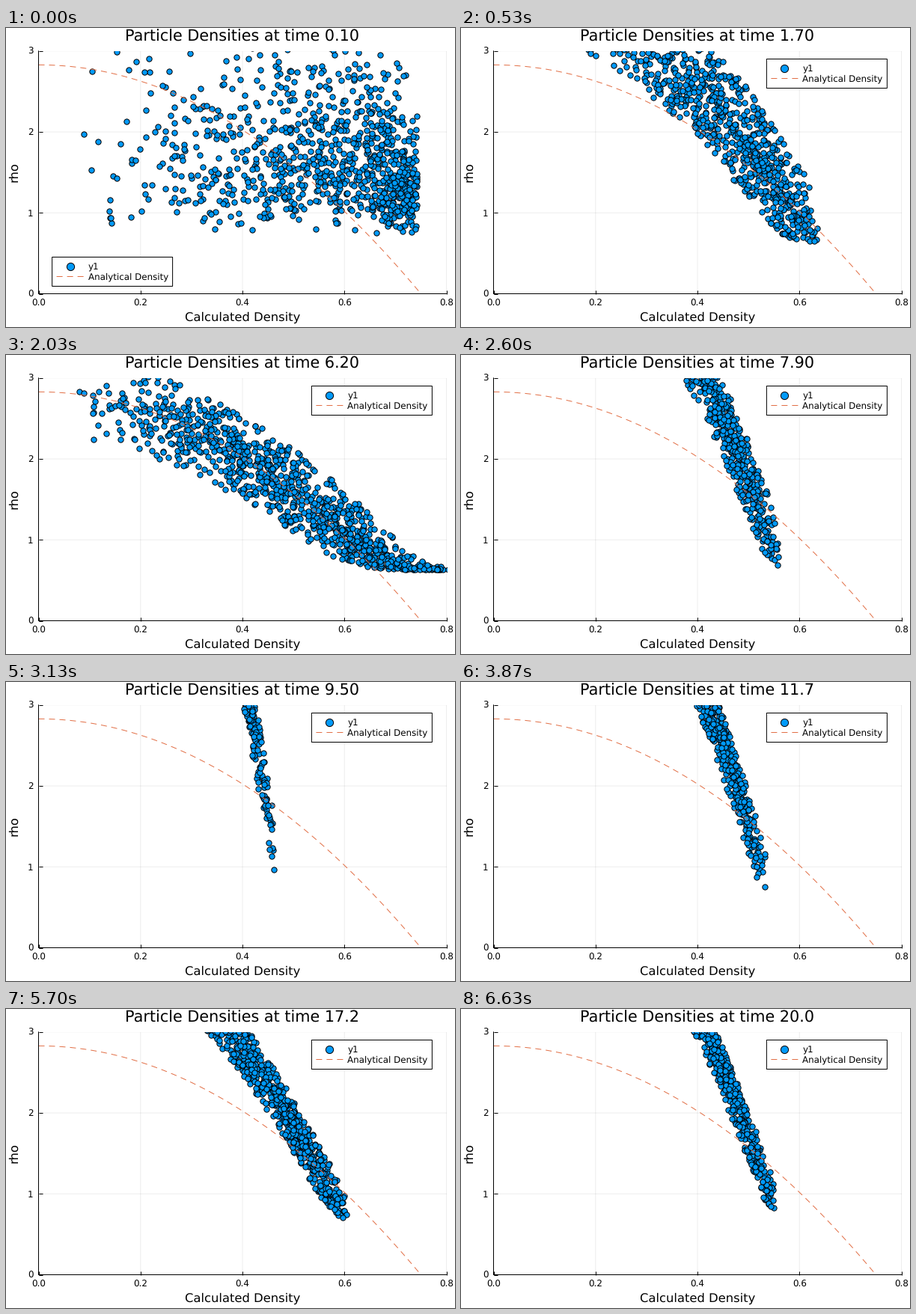
These frames come from a looping animation (600 px wide and 400 px high, 6660 ms). A matplotlib script:

```python
import numpy as np
import matplotlib as mpl
import matplotlib.pyplot as plt
from matplotlib.animation import FuncAnimation
from matplotlib.patches import Rectangle

W, H, PX = 600, 400, 0.72          # stage size, points per pixel at 100 dpi
TICK, LOOP, FPS = 30, 6660, 30     # clock step and loop in ms, data rate
LEFT, RIGHT, TOP, BOTTOM = 43.5, 588.5, 30.8, 355.5
BLUE, ORANGE = "#009afa", "#e26f46"
DASH = (0, (8, 6))
SMALL, MEDIUM, LARGE = 11.87, 16.33, 20.75
STAR_R, CENTRE, FLOOR = 0.75, 2.829, 0.63

mpl.rcParams.update({
    "font.family": "DejaVu Sans",
    "text.hinting": "none",
    "path.snap": False,
    "axes.linewidth": PX,
    "axes.axisbelow": True,
})

# --- particles ---------------------------------------------------------

N = 1000
rng = np.random.default_rng(12)
mass = rng.random(N)                                # enclosed mass fraction
grid = np.linspace(0, 1, 500)
shell = np.interp(mass, (5 * grid**3 - 3 * grid**5) / 2, grid)
ball = np.cbrt(mass)
clump = rng.gamma(3.6, 1 / 3.6, N)
freq = rng.uniform(1.5, 4, (3, N))
phase = rng.uniform(0, 2 * np.pi, (3, N))


def radius(t):
    """Outer radius of the damped, breathing star."""
    amp = 0.052 * np.exp(-t / 40) + 0.115 / (1 + np.exp((t - 10.3) / 0.7))
    return 0.62 + amp * np.cos(2 * np.pi * t / 2.12)


def particles(t):
    R = radius(t)
    wave = np.sin(freq * t + phase)

    # settled star: parabolic profile of constant mass
    edge = 0.94 + 1.6 * max(0, R - 0.67)
    r = R * shell * (1 + (edge - 1) * shell**6) * (1 + 0.015 * wave[2])
    steep = CENTRE / STAR_R**2 * (STAR_R / R) ** 5
    noise = (0.12 + 0.28 * np.exp(-t / 9)) * (wave[0] + wave[1])
    profile = steep * (R**2 - r**2) + 0.06 + noise
    rho = FLOOR + 0.2 * np.logaddexp(0, (profile - FLOOR) / 0.2)

    # initial uniform ball with clumpy density
    squeeze = R / radius(0.1)
    r0 = 0.743 * ball * squeeze
    fade = 1 - 0.4 * np.clip((ball - 0.86) / 0.14, 0, 1)
    rho0 = FLOOR + 1.15 * fade * clump / squeeze**3

    mix = np.exp(-(((t - 0.1) / 0.8) ** 2))
    return r + mix * (r0 - r), rho + mix * (rho0 - rho)


# --- stage -------------------------------------------------------------

fig = plt.figure(figsize=(W / 100, H / 100), dpi=100, facecolor="white")
ax = fig.add_axes([LEFT / W, 1 - BOTTOM / H, (RIGHT - LEFT) / W, (BOTTOM - TOP) / H])
ax.set(xlim=(0, 0.8), ylim=(0, 3), xticks=np.arange(5) / 5, yticks=range(4))
ax.spines[["top", "right"]].set_visible(False)
ax.tick_params(direction="in", length=5 * PX, width=PX,
               labelbottom=False, labelleft=False)
ax.grid(color="black", alpha=0.07, lw=PX)

dot = dict(ls="none", marker="o", mfc=BLUE, mec="black", mew=PX)
dots, = ax.plot([], [], ms=7.3 * PX, **dot)
x = np.linspace(0, STAR_R, 300)
ax.plot(x, CENTRE * (1 - (x / STAR_R) ** 2), color=ORANGE, lw=PX, ls=DASH,
        dash_capstyle="butt")

# pixel-space layer for text and legend
page = fig.add_axes([0, 0, 1, 1], zorder=5)
page.set(xlim=(0, W), ylim=(H, 0))
page.axis("off")


def label(x, y, text, size, ha="center", **kw):
    return page.text(x, y, text, fontsize=size * PX, ha=ha, va="baseline", **kw)


def legend(x, y):
    box = Rectangle((x, y), 161, 39, fc="white", ec="black", lw=PX)
    page.add_patch(box)
    mark, = page.plot(x + 24, y + 12.6, ms=10.2 * PX, **dot)
    line, = page.plot([x + 6, x + 43], [y + 26, y + 26], color=ORANGE, lw=PX,
                      ls=DASH, dash_capstyle="butt")
    return [box, mark, line,
            label(x + 48, y + 17.4, "y1", SMALL, "left"),
            label(x + 48, y + 30.4, "Analytical Density", SMALL, "left")]


mid = (LEFT + RIGHT) / 2
title = label(mid, 18, "", LARGE)
label(mid, 391.7, "Calculated Density", MEDIUM)
label(15, 193, "rho", MEDIUM, rotation=90, rotation_mode="anchor")
for i in range(5):
    label(LEFT + i * (RIGHT - LEFT) / 4, 371.7, f"{i / 5:.1f}", SMALL)
for i in range(4):
    label(36.3, BOTTOM - i * (BOTTOM - TOP) / 3 + 4.3, str(i), SMALL, "right")

low_left, top_right = legend(61.6, 306.5), legend(408.4, 41.5)


def update(k):
    step = (k * TICK + 25) * FPS // 1000     # data step showing at this tick
    t = (step + 1) / 10
    dots.set_data(*particles(t))
    title.set_text(f"Particle Densities at time {f'{t:.2f}'[:4]}")
    early = t < 0.65
    for artist in low_left:
        artist.set_visible(early)
    for artist in top_right:
        artist.set_visible(not early)
    return [dots, title, *low_left, *top_right]


anim = FuncAnimation(fig, update, frames=LOOP // TICK, interval=TICK,
                     repeat=True, repeat_delay=0, blit=False)
plt.show()
```
